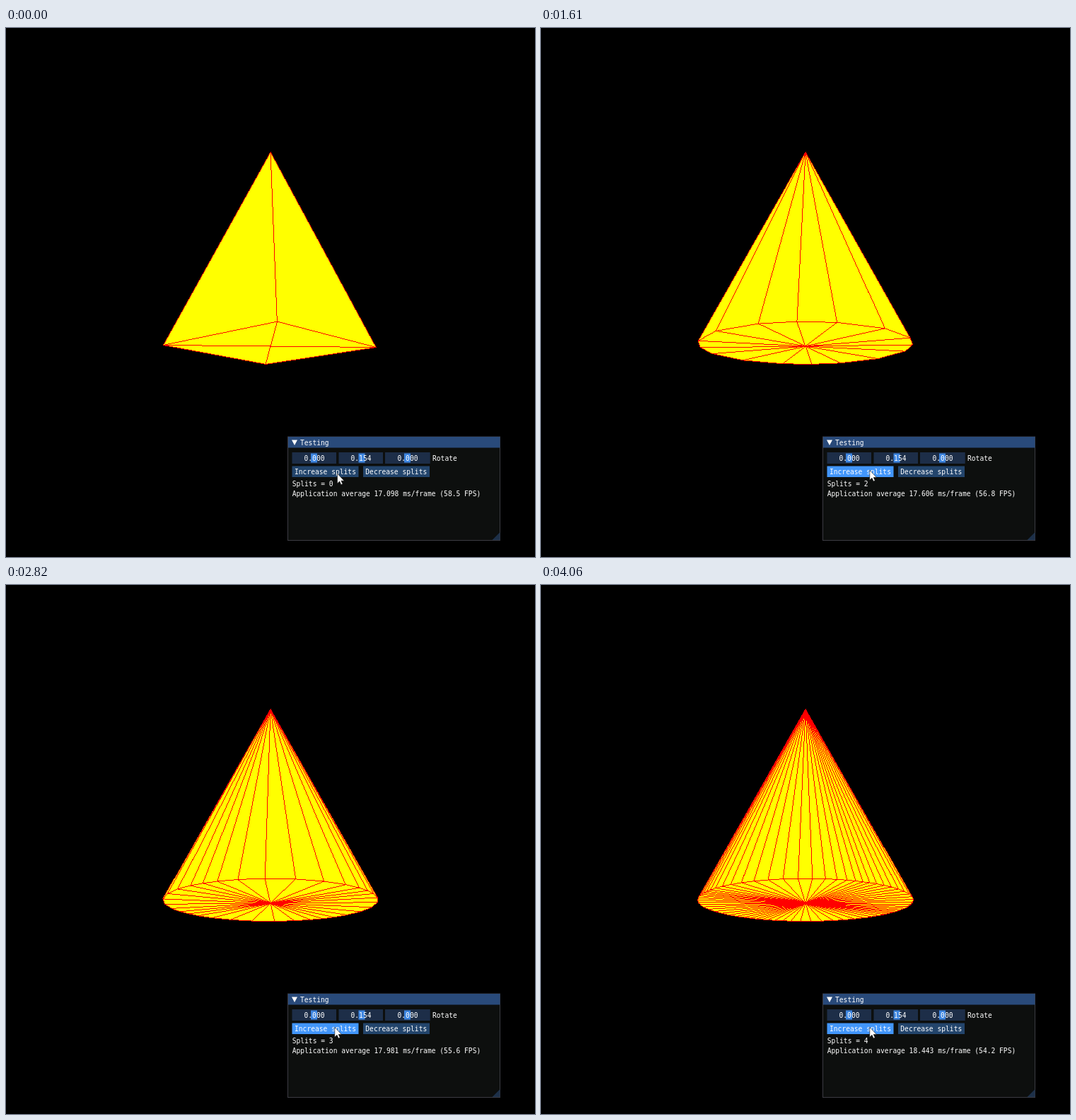
Recreate the animation shown at these times as an HTML page with a canvas. Size 748 by 748 pixels, loop 4080 ms.

```html
<!DOCTYPE html>
<html lang="en">
<head>
<meta charset="utf-8">
<title>Cone splits</title>
<style>
  html, body { margin: 0; width: 100%; height: 100%; overflow: hidden; background: #000; }
  canvas { position: absolute; left: 210px; top: 165px; }
  svg { position: absolute; left: 0; top: 0; }
  text { font: 9.63px "DejaVu Sans Mono", monospace; fill: #fff; white-space: pre; }
  .mid { text-anchor: middle; }
  .frame { fill: #1d2e48; }
  .grab { fill: #3d85e0; }
  .button { fill: #23456c; }
</style>
</head>
<body>
<canvas id="view" width="330" height="320"></canvas>
<svg width="748" height="748" viewBox="0 0 748 748">
  <rect x="398.5" y="578" width="300" height="146.5" fill="#0d0f0e" stroke="#3b3b43"/>
  <rect x="399" y="578" width="299.5" height="15.5" fill="#294a7a"/>
  <path d="M404 582.5h8l-4 7.5z" fill="#fff"/>
  <text x="416" y="589.7">Testing</text>
  <path d="M687.5 724h11v-11z" fill="#1d3049"/>

  <g class="frame">
    <rect x="404.5" y="600" width="62.5" height="16"/>
    <rect x="470.5" y="600" width="62.5" height="16"/>
    <rect x="536" y="600" width="63.7" height="16"/>
  </g>
  <g class="grab">
    <rect x="431" y="601.5" width="9" height="13"/>
    <rect x="498.5" y="601.5" width="9" height="13"/>
    <rect x="563" y="601.5" width="9" height="13"/>
  </g>
  <g class="mid">
    <text x="436" y="611.7">0.000</text>
    <text x="502" y="611.7">0.154</text>
    <text x="568" y="611.7">0.000</text>
  </g>
  <text x="603" y="611.7">Rotate</text>

  <rect id="more" class="button" x="404.5" y="619.5" width="94" height="15.5"/>
  <rect class="button" x="505" y="619.5" width="94" height="15.5"/>
  <text x="408" y="631">Increase splits</text>
  <text x="508.3" y="631">Decrease splits</text>
  <text id="count" x="404.7" y="647.6"></text>
  <text id="speed" x="404.7" y="661.7"></text>

  <circle id="halo" cx="465" cy="626.5" r="10" fill="#ebbe00" fill-opacity=".55"/>
  <path id="cursor" d="M0 0V14L3.2 11L5.3 15.7L7.5 14.8L5.4 10.2H9.7Z"
        fill="#fff" stroke="#111" stroke-width=".6"/>
</svg>
<script>
const LOOP = 4080, STEP = 530 / 21;
const YELLOW = 0xff00ffff, RED = 0xff0000ff;
const PRESSES = [560, 1420, 2290, 3150], HOLD = 110;

// Spin angle in degrees and frame cost in ms, over time
const TIMES = [0, 752, 1610, 2494, 3175, 3528, 4058];
const ANGLES = [3, 42.7, 86.1, 130.9, 163.4, 181.1, 207.6];
const COSTS = [17.098, 17.418, 17.606, 17.894, 18.075, 18.476, 18.443];

const el = id => document.getElementById(id);
const more = el('more'), count = el('count'), speed = el('speed');
const halo = el('halo'), cursor = el('cursor');
const ctx = el('view').getContext('2d');
const W = 330, H = 320;
const image = ctx.createImageData(W, H);
const pixels = new Uint32Array(image.data.buffer);
const APEX = [164, 10.7], CENTER = [164, 285];

function lerpAt(t, values) {
  let i = 0;
  while (i < TIMES.length - 2 && t > TIMES[i + 1]) i++;
  const p = (t - TIMES[i]) / (TIMES[i + 1] - TIMES[i]);
  return values[i] + (values[i + 1] - values[i]) * Math.max(0, Math.min(1, p));
}

// Perspective view of the base rim from slightly below
function rimPoint(a) {
  const c = Math.cos(a), depth = 1 - 0.157 * c;
  return [164 + 150.6 * Math.sin(a) / depth, 209 + (76 - 41.4 * c) / depth];
}

// The square's edges are split evenly, then pushed out to the circle
function rim(splits, spin) {
  const n = 2 ** splits, points = [];
  for (let side = 0; side < 4; side++)
    for (let k = 0; k < n; k++)
      points.push(rimPoint(spin + side * Math.PI / 2 + Math.atan2(k, n - k)));
  return points;
}

function trace([x0, y0], [x1, y1], plot) {
  const dx = x1 - x0, dy = y1 - y0;
  const steps = Math.ceil(Math.max(Math.abs(dx), Math.abs(dy), 1));
  for (let i = 0; i <= steps; i++)
    plot(Math.floor(x0 + dx * i / steps), Math.floor(y0 + dy * i / steps));
}

const facesViewer = (p, q) =>
  (p[0] - APEX[0]) * (q[1] - APEX[1]) < (p[1] - APEX[1]) * (q[0] - APEX[0]);

function drawCone(splits, spin) {
  const points = rim(splits, spin), lines = [];
  points.forEach((p, i) => {
    const q = points[(i + 1) % points.length];
    lines.push([p, q], [CENTER, p]);
    if (facesViewer(p, q)) lines.push([APEX, p], [APEX, q]);
  });

  const lo = new Array(H).fill(W), hi = new Array(H).fill(-1);
  for (const [a, b] of lines) trace(a, b, (x, y) => {
    lo[y] = Math.min(lo[y], x);
    hi[y] = Math.max(hi[y], x);
  });
  pixels.fill(0);
  for (let y = 0; y < H; y++)
    if (hi[y] >= lo[y]) pixels.fill(YELLOW, y * W + lo[y], y * W + hi[y] + 1);
  for (const [a, b] of lines) trace(a, b, (x, y) => { pixels[y * W + x] = RED; });
  ctx.putImageData(image, 0, 0);
}

function render(t) {
  const splits = PRESSES.filter(p => t >= p + HOLD).length;
  const pressed = PRESSES.some(p => t >= p && t < p + HOLD);
  const cost = lerpAt(t, COSTS);

  drawCone(splits, lerpAt(t, ANGLES) * Math.PI / 180);
  count.textContent = `Splits = ${splits}`;
  speed.textContent = `Application average ${cost.toFixed(3)} ms/frame (${(1000 / cost).toFixed(1)} FPS)`;

  more.style.fill = pressed ? '#0f87fa' : t >= 20 ? '#4296fa' : '';
  halo.style.display = pressed ? '' : 'none';
  const rest = Math.max(0, 1 - t / 200) ** 2;
  cursor.setAttribute('transform', `translate(${464.8 + 3.7 * rest} ${625.3 + 4.7 * rest})`);
}

const start = performance.now();
let last = -1;
function tick() {
  const t = (performance.now() - start) % LOOP;
  const step = Math.floor((t + 10) / STEP);
  if (step !== last) {
    last = step;
    render(Math.max(0, step * STEP - 5));
  }
  requestAnimationFrame(tick);
}
tick();
</script>
</body>
</html>
```
